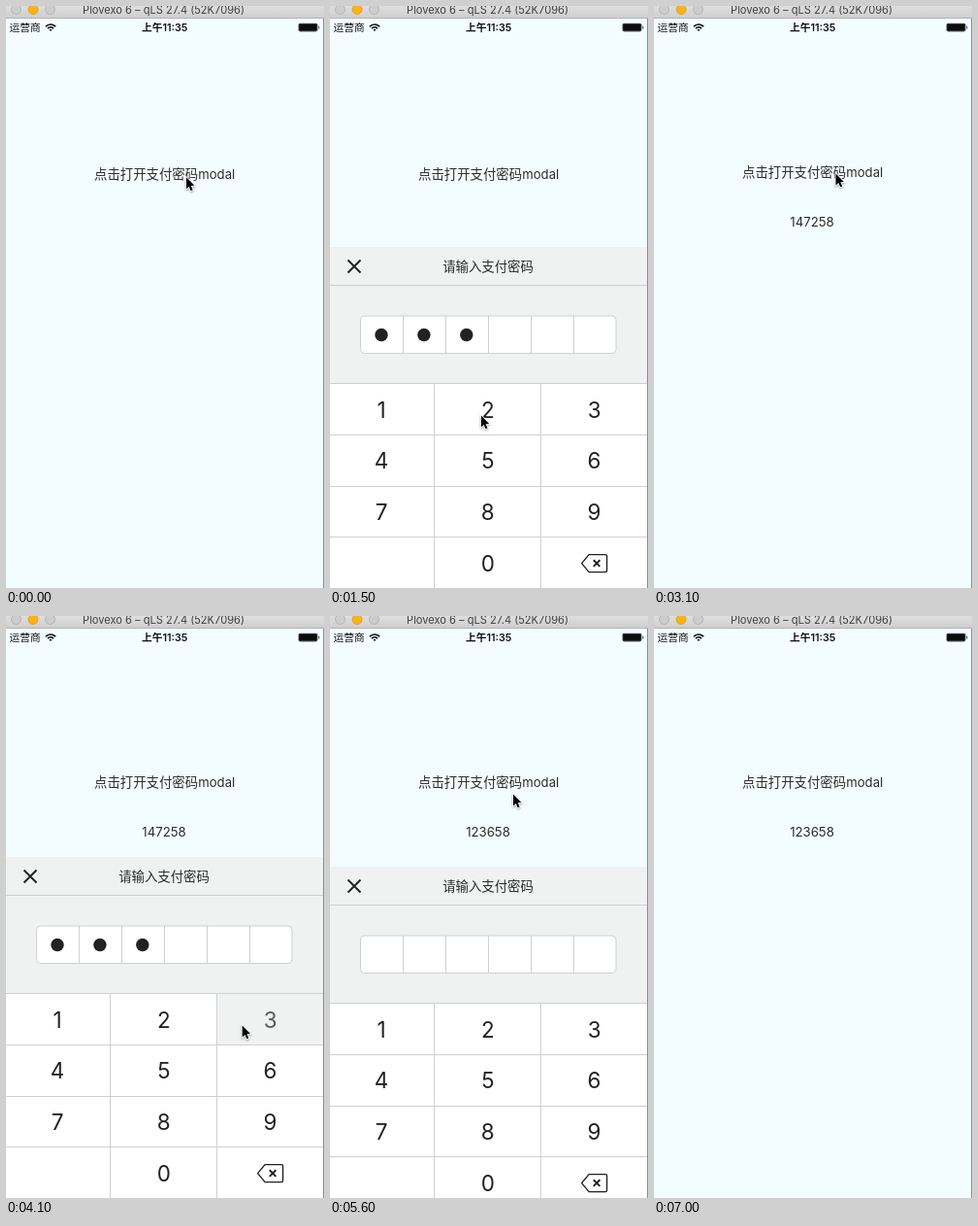
An HTML page with a canvas that plays this animation: 328 by 599 pixels, repeating every 7.1 s.

```html
<!DOCTYPE html>
<html lang="zh">
<head>
<meta charset="utf-8">
<style>
html, body { margin: 0; width: 100%; height: 100%; overflow: hidden; background: #f3fcff; }
canvas { display: block; width: 328px; height: 599px; }
</style>
</head>
<body>
<canvas id="stage"></canvas>
<script>
const W = 328, H = 599, LOOP = 7100, STEP = 100;
const canvas = document.getElementById('stage');
const ctx = canvas.getContext('2d');
const ratio = window.devicePixelRatio || 1;
canvas.width = W * ratio;
canvas.height = H * ratio;

const LATIN = 'Inter, Roboto, sans-serif';
const HAN = '"Noto Sans CJK SC", "Noto Sans CJK", sans-serif';
const INK = '#222', TEXT = '#2b2b2b', DARK = '#111', PANEL = '#f0f1f1', RULE = '#cfd0d1';
const SHEET_TOP = 248, SHEET_H = H - SHEET_TOP, MID = 163;
const CLOSE_X = 25, CLOSE_Y = 268;

const rowEdge = row => Math.round(388 + 52.8 * row);
const colEdge = col => 110 * col - 2;
const keyX = col => 53 + 109.8 * col;
const keyY = row => 415.5 + 52.7 * row;

// Column and row of a digit on the keypad.
function cell(digit) {
  const n = digit === 0 ? 10 : digit - 1;
  return [n % 3, Math.floor(n / 3)];
}

// Keys are pressed at an even pace; `rest` is where the pointer waits before tapping.
const sessions = [
  { open: 0, close: 2400, code: '147258', first: 750, gap: 300, rest: [186, 176.3] },
  { open: 3100, close: 4700, code: '123658', first: 3650, gap: 200, rest: [187.5, 172.5] },
  { open: 5300, close: 6100, code: '', first: 0, gap: 0, rest: [189, 183.5] }
];

// The pointer stays at each place from `from` to `to` and glides in between.
function pointerStops() {
  const stops = [];
  const stay = (from, to, x, y) => stops.push({ from, to, x, y });
  for (const s of sessions) {
    stay(s.open - 100, s.open + 300, ...s.rest);
    [...s.code].forEach((digit, i) => {
      const [col, row] = cell(+digit), press = s.first + i * s.gap;
      const x = MID + (keyX(col) - MID) * 0.8 - 7;
      stay(press - s.gap / 2, press + s.gap / 4, x, keyY(row) + 6);
    });
    if (!s.code) stay(s.close - 100, s.close, CLOSE_X, CLOSE_Y);
  }
  stay(LOOP - STEP, LOOP, 230, -30);
  return stops;
}
const stops = pointerStops();

function pointerAt(t) {
  const i = stops.findIndex(s => t <= s.to);
  const b = stops[i];
  if (t >= b.from) return [b.x, b.y];
  const a = stops[i - 1];
  const p = (t - a.to) / (b.from - a.to), e = p * p * (3 - 2 * p);
  return [a.x + (b.x - a.x) * e, a.y + (b.y - a.y) * e];
}

const decay = (t, span) => Math.pow(1 - Math.min(1, Math.max(0, t / span)), 3);

function sheetOffset(s, t) {
  const hidden = t > s.close ? 1 - decay(t - s.close, 300) : decay(t - s.open, 430);
  return hidden * SHEET_H;
}

function text(str, x, y, size, { font = LATIN, weight = 400, color = TEXT, align = 'left' } = {}) {
  ctx.font = `${weight} ${size}px ${font}`;
  ctx.fillStyle = color;
  ctx.textAlign = align;
  ctx.textBaseline = 'alphabetic';
  ctx.fillText(str, x, y);
}

function rect(x, y, w, h, color) {
  ctx.fillStyle = color;
  ctx.fillRect(x, y, w, h);
}

function paint(fill, edge, width = 1) {
  if (fill) {
    ctx.fillStyle = fill;
    ctx.fill();
  }
  if (edge) {
    ctx.strokeStyle = edge;
    ctx.lineWidth = width;
    ctx.stroke();
  }
}

function disc(x, y, r, fill, edge) {
  ctx.beginPath();
  ctx.arc(x, y, r, 0, Math.PI * 2);
  paint(fill, edge);
}

function roundBox(x, y, w, h, r, fill, edge) {
  ctx.beginPath();
  ctx.roundRect(x, y, w, h, r);
  paint(fill, edge);
}

function cross(x, y, r, width) {
  ctx.beginPath();
  for (const d of [r, -r]) {
    ctx.moveTo(x - d, y - r);
    ctx.lineTo(x + d, y + r);
  }
  paint(null, INK, width);
}

function drawTitleBar() {
  const g = ctx.createLinearGradient(0, 0, 0, 12);
  g.addColorStop(0, '#dedede');
  g.addColorStop(1, '#cfcfcf');
  rect(0, 0, W, 12, g);
  rect(0, 12, W, 1, '#b3b3b3');
  for (let i = 0; i < 3; i++) {
    const lit = i === 1;
    disc(10.5 + 17.5 * i, 3.5, 5, lit ? '#fdb316' : '#cdcdcd', lit ? '#e5a11c' : '#b5b5b5');
  }
  text('Plovexo 6 – qLS 27.4 (52K7096)', 162.5, 8, 11.1, { color: '#404040', align: 'center' });
}

function drawStatus() {
  text('运营商', 3.5, 26, 10.7, { font: HAN, color: DARK });
  for (let i = 0; i < 3; i++) {
    ctx.beginPath();
    ctx.arc(46, 26, 1.2 + 2.9 * i, -Math.PI * 0.76, -Math.PI * 0.24);
    paint(null, DARK, 1.7);
  }
  text('上午', 140, 26, 10.7, { font: HAN, weight: 700, color: DARK });
  text('11:35', 161.5, 26, 10.7, { weight: 600, color: DARK });
  roundBox(301.5, 17.8, 20, 8.6, 1.8, '#5c6062');
  roundBox(302.3, 18.6, 18.4, 7, 1, '#0c0c0c');
  rect(322.3, 20.6, 1, 3, '#444');
}

function drawHome(code) {
  const y = code ? 176.3 : 178.3;
  text('点击打开支付密码', 91, y, 13.4, { font: HAN });
  text('modal', 198.3, y, 13.1);
  text(code, MID, 227.3, 13.2, { align: 'center' });
}

function drawBackspace(x, y) {
  ctx.beginPath();
  ctx.moveTo(x - 13, y);
  ctx.lineTo(x - 5.5, y - 9);
  ctx.arcTo(x + 13, y - 9, x + 13, y, 1.5);
  ctx.arcTo(x + 13, y + 9, x, y + 9, 1.5);
  ctx.lineTo(x - 5.5, y + 9);
  ctx.closePath();
  ctx.lineJoin = 'round';
  paint(null, INK, 1.4);
  cross(x + 2.5, y, 3.3, 2);
}

function drawKeys(pressed) {
  rect(0, rowEdge(0), 327, H - rowEdge(0), '#fff');
  for (let digit = 0; digit < 10; digit++) {
    const [col, row] = cell(digit), down = digit === pressed;
    if (down) rect(colEdge(col), rowEdge(row), 110, 53, PANEL);
    text(String(digit), keyX(col), keyY(row) + 8, 22.5, { align: 'center', color: down ? '#58595b' : INK });
  }
  for (let row = 0; row < 4; row++) rect(0, rowEdge(row), 327, 1, RULE);
  for (let col = 1; col < 3; col++) rect(colEdge(col) - 1, rowEdge(0), 1, H - rowEdge(0), RULE);
  drawBackspace(keyX(2), keyY(3));
}

function drawSheet(offset, dots, pressed) {
  ctx.save();
  ctx.translate(0, Math.round(offset));
  rect(0, SHEET_TOP, 327, SHEET_H, PANEL);
  rect(0, 287, 327, 1, RULE);
  cross(CLOSE_X, CLOSE_Y, 6.5, 1.9);
  text('请输入支付密码', MID, 272.6, 13.4, { font: HAN, align: 'center' });

  roundBox(31.5, 319, 263.5, 38.5, 4, '#fff', RULE);
  for (let i = 0; i < 6; i++) {
    if (i) rect(31 + i * 44, 319, 1, 38, RULE);
    if (i < dots) disc(53 + i * 43.9, 338.5, 6.7, INK);
  }
  drawKeys(pressed);
  ctx.restore();
}

function drawPointer(x, y) {
  ctx.save();
  ctx.translate(x, y);
  ctx.scale(0.95, 0.95);
  ctx.beginPath();
  ctx.moveTo(0, 0);
  ctx.lineTo(0, 12.5);
  ctx.lineTo(2.9, 9.9);
  ctx.lineTo(4.9, 14.6);
  ctx.lineTo(7, 13.7);
  ctx.lineTo(5, 9.1);
  ctx.lineTo(8.8, 9);
  ctx.closePath();
  ctx.lineJoin = 'miter';
  ctx.shadowColor = 'rgba(0,0,0,.35)';
  ctx.shadowBlur = 2 * ratio;
  ctx.shadowOffsetY = ratio;
  paint(null, '#fff', 1.8);
  ctx.shadowColor = 'transparent';
  paint('#000');
  ctx.restore();
}

function draw(t) {
  ctx.setTransform(ratio, 0, 0, ratio, 0, 0);
  rect(0, 0, W, H, '#f3fcff');

  const done = sessions.filter(s => s.code && t > s.close).pop();
  drawHome(done ? done.code : '');

  const s = sessions.filter(v => v.open <= t).pop();
  const offset = sheetOffset(s, t);
  if (offset < SHEET_H - 0.5) {
    const since = t - s.first;
    const dots = since < 0 ? 0 : Math.min(s.code.length, Math.floor(since / s.gap) + 1);
    const fresh = dots && since - (dots - 1) * s.gap < STEP;
    drawSheet(offset, dots, fresh ? +s.code[dots - 1] : -1);
  }

  rect(327, 13, 1, H - 13, '#8c9092');
  drawTitleBar();
  drawStatus();
  drawPointer(...pointerAt(t));
}

const start = performance.now();
function tick(now) {
  const t = Math.max(0, now - start) % LOOP;
  draw(Math.floor(t / STEP) * STEP);
  requestAnimationFrame(tick);
}
draw(0);
requestAnimationFrame(tick);
</script>
</body>
</html>
```
